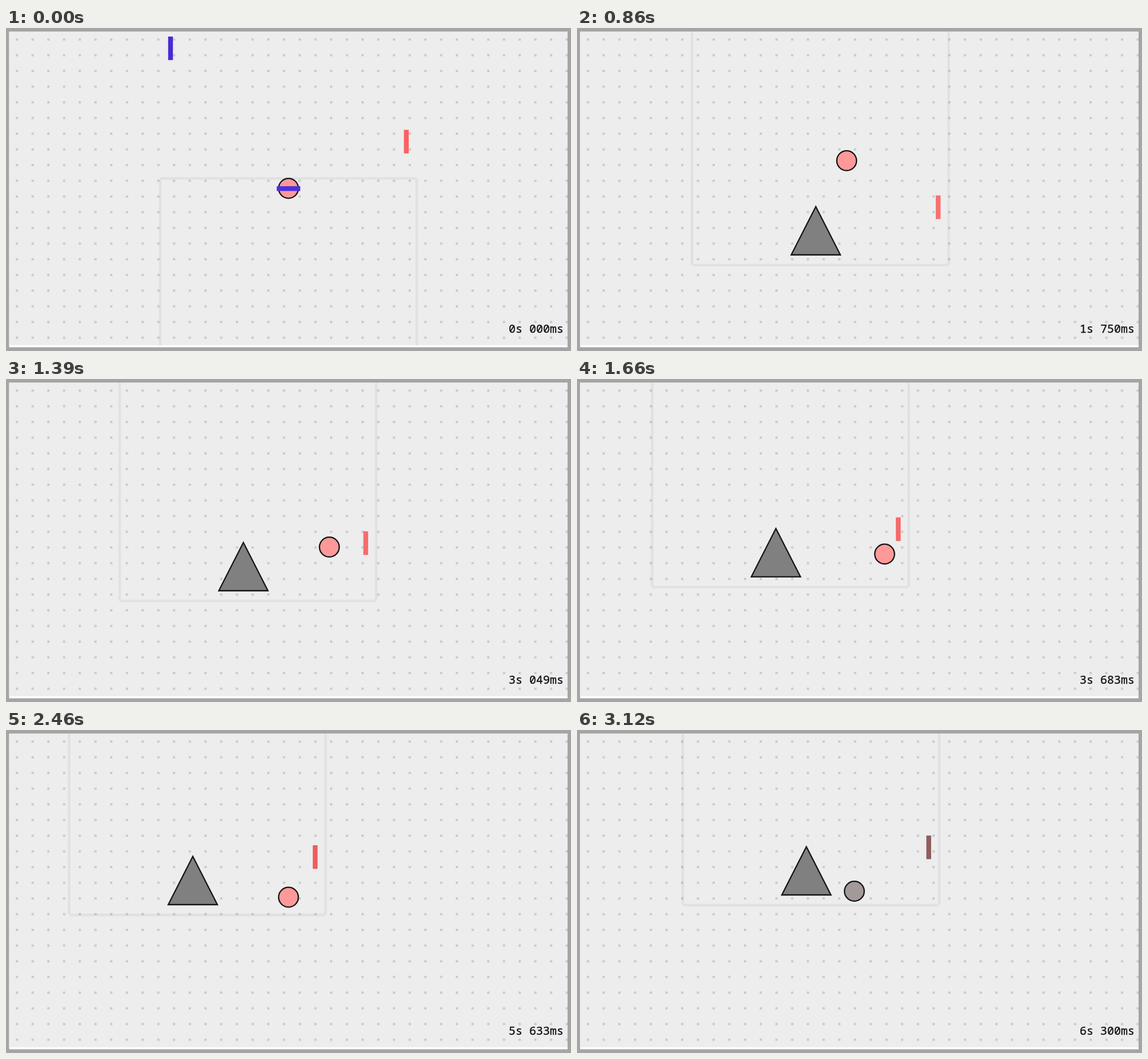
An HTML page that plays this animation: 989 px wide and 566 px high, repeating every 3190 ms.

```html
<!DOCTYPE html>
<html lang="en">
<head>
<meta charset="utf-8">
<title>Bouncing ball room</title>
<style>
  html, body { margin: 0; width: 100%; height: 100%; overflow: hidden; background: #a5a5a5; }
  svg { display: block; width: 989px; height: 566px; }
  text { font: 500 20px "Noto Sans Mono", "DejaVu Sans Mono", monospace; fill: #141414; stroke: #141414; stroke-width: .4px; white-space: pre; }
  .solid { stroke: #141414; stroke-width: 2.3px; }
</style>
</head>
<body>
<svg viewBox="0 0 989 566">
  <defs>
    <pattern id="dots" x="5.25" y="6.25" width="27.5" height="27.5" patternUnits="userSpaceOnUse">
      <rect x="12" y="12" width="4" height="4" rx=".6" fill="#c9c9c9"/>
    </pattern>
    <clipPath id="view"><rect x="5.5" y="6.5" width="977.5" height="549.5"/></clipPath>
  </defs>
  <rect width="989" height="566" fill="#a5a5a5"/>
  <rect x="5.5" y="6.5" width="977.5" height="553" fill="#fff"/>
  <g clip-path="url(#view)">
    <rect width="989" height="566" fill="#ededed"/>
    <rect width="989" height="566" fill="url(#dots)"/>
    <g id="room">
      <path id="walls" d="M-222-224.5H222M224.5-222V222M222 224.5H-222M-224.5 222V-222"
        fill="none" stroke="#000" stroke-opacity=".05" stroke-width="4.5" stroke-linecap="round"/>
      <path id="spike" class="solid" d="M-8 122L35 206.5H-51Z" fill="#808080"/>
      <rect id="redDoor" x="202" y="102.4" width="8.4" height="41.4"/>
      <rect id="topDoor" x="-20.6" y="-210.6" width="41.2" height="8.4"/>
      <circle id="ball" class="solid" r="17.3"/>
      <g id="entry" fill="#4a2ad2">
        <rect x="-210.7" y="-61" width="8.4" height="41.2"/>
        <rect x="-20.6" y="201.2" width="41.2" height="8.4" fill="#4d31dc"/>
      </g>
    </g>
  </g>
  <text id="clock" x="976" y="534" text-anchor="end"></text>
</svg>
<script>
const $ = id => document.getElementById(id);
const LOOP = 3190, START = 200, STEP = 200 / 3, GAME_OVER_MS = 6300;

// Turning points: step, ball x and y, camera x and y, from the room's centre.
const keys = [
  [-1, 0, 205, 0, 207.5],
  [3.5, 70, -195, 60, -62],
  [6, 171.5, 137.5, 82, 22.5],
  [10, 46, 41.5, 68.5, 92.5],
  [13, -198, -180, 56, 70],
  [18, 142.5, 130, 71, 119],
  [21, 190, 165, 143, 140],
  [27, 86.5, 171.5, 80, 156],
  [34, 159.5, 193.5, 159.5, 184],
  [39, 76, 200, 121, 197],
  [44, 76, 200, 85, 201]
];

const clamp = (v, lo = 0, hi = 1) => Math.min(hi, Math.max(lo, v));
const mix = (a, b, u) => a + (b - a) * u;
const blend = (a, b, u) => `rgb(${a.map((v, i) => Math.round(mix(v, b[i], u)))})`;
const show = (id, visible) => { $(id).style.display = visible ? "" : "none"; };

// Slope of one value at a key: flat wherever the motion turns around.
function slopeAt(i, c) {
  if (i === 0 || i === keys.length - 1) return 0;
  const rate = j => (keys[j + 1][c] - keys[j][c]) / (keys[j + 1][0] - keys[j][0]);
  const before = rate(i - 1), after = rate(i);
  return before * after > 0 ? 2 * before * after / (before + after) : 0;
}

function poseAt(k) {
  let i = 0;
  while (i < keys.length - 2 && k >= keys[i + 1][0]) i++;
  const a = keys[i], b = keys[i + 1], span = b[0] - a[0], u = clamp((k - a[0]) / span);
  return [1, 2, 3, 4].map(c => mix(a[c], b[c], u * u * (3 - 2 * u))
    + span * u * (1 - u) * ((1 - u) * slopeAt(i, c) - u * slopeAt(i + 1, c)));
}

// The summed 1/60 s ticks drift just below their exact value.
function clockText(tick) {
  const ms = Math.min(GAME_OVER_MS, Math.floor(tick * 50 / 3 + 1.5e-6 - tick * 1e-8));
  return `${Math.floor(ms / 1000)}s ${String(ms % 1000).padStart(3, "0")}ms`;
}

function draw(t) {
  const started = t >= START;
  const k = started ? Math.floor((Math.floor(t / 10) * 10 - 183.4) / STEP) : -1;
  const [x, y, cameraX, cameraY] = poseAt(k);
  const fade = clamp((k - 38) / 6), age = clamp(k / 34) ** 2;

  $("room").setAttribute("transform", `translate(${494.5 - cameraX} ${283.5 - cameraY})`);
  $("walls").setAttribute("transform", `translate(0 ${started ? 0 : 412})`);
  show("entry", !started);
  show("spike", started);
  show("topDoor", started);

  $("ball").setAttribute("cx", x);
  $("ball").setAttribute("cy", y);
  $("ball").setAttribute("fill", blend([255, 153, 153], [163, 153, 153], fade));
  const red = started ? [mix(250, 236, age), mix(114, 94, age), mix(114, 94, age)] : [255, 96, 96];
  $("redDoor").setAttribute("fill", blend(red, [141, 94, 94], fade));
  $("topDoor").setAttribute("fill", blend([74, 42, 210], [76, 84, 240], clamp(k / 6)));
  $("clock").textContent = clockText(started ? Math.floor(9 + 9.68 * k) : 0);
}

const origin = performance.now();
function frame() {
  draw((performance.now() - origin) % LOOP);
  requestAnimationFrame(frame);
}
draw(0);
requestAnimationFrame(frame);
</script>
</body>
</html>
```
